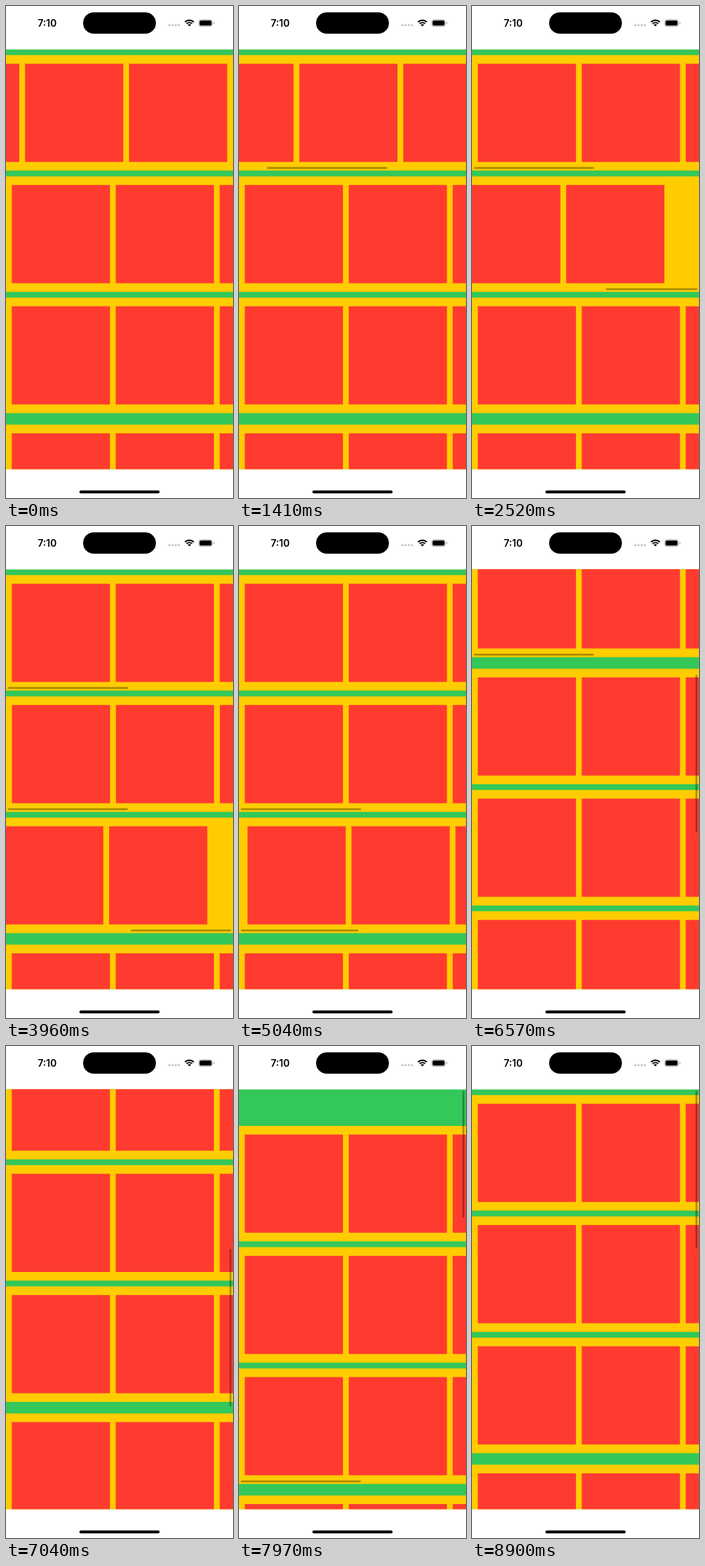
Animation of 295x640 px, one loop 9400 ms. Source, as an HTML page:

```html
<!DOCTYPE html>
<html lang="en">
<head>
<meta charset="utf-8">
<title>Nested scrolling</title>
<style>
  html, body { margin: 0; width: 100%; height: 100%; overflow: hidden; background: #fff; }
  svg { display: block; width: 100vw; height: 100vh; }
  .clock { font: 600 17px Inter, Roboto, sans-serif; text-anchor: middle; }
  .page { fill: #34c759; }
  .row { fill: #fc0; }
  .card { fill: #ff3b30; }
  .bar { fill: #000; opacity: 0; }
</style>
</head>
<body>
<svg viewBox="0 0 393 852" preserveAspectRatio="none">
  <text class="clock" x="71.3" y="35.3">7:10</text>
  <rect x="133.5" y="11" width="126" height="37" rx="18.5"/>
  <g fill="#c4c4c6">
    <circle cx="283" cy="33.2" r="1.9"/><circle cx="288.4" cy="33.2" r="1.9"/>
    <circle cx="293.8" cy="33.2" r="1.9"/><circle cx="299.2" cy="33.2" r="1.9"/>
  </g>
  <g fill="none" stroke="#000" stroke-width="2.6">
    <path d="M309.9 27.8A10.8 10.8 0 0 1 325.1 27.8M312.8 30.7A6.7 6.7 0 0 1 322.2 30.7"/>
  </g>
  <path d="M314.7 32.6A4 4 0 0 1 320.3 32.6L317.5 35.4Z"/>
  <rect x="333.5" y="23.5" width="24" height="12" rx="3.8" fill="none" stroke="#a6a6a6"/>
  <rect x="335" y="25" width="21" height="9" rx="2.5"/>
  <path d="M359.3 27.5Q360.8 28 360.8 29.5T359.3 31.5Z" fill="#a6a6a6"/>
  <rect x="127" y="839" width="139" height="5" rx="2.5"/>

  <svg id="view" y="75" width="393" height="727">
    <rect class="page" width="393" height="727"/>
    <g id="content"></g>
  </svg>
</svg>
<script>
// All lengths are in points, all times in milliseconds.
const LOOP = 9400, WIDTH = 393, HEIGHT = 727;
const ROW_WIDTH = 730, ROW_END = ROW_WIDTH - WIDTH, PAGE_HEIGHT = 1920;
const SPRING = 10;  // bounce stiffness, per second

// Screen refreshes come in bursts: first, last, count.
const bursts = [
  [880, 990, 2], [1170, 2070, 9], [2180, 2720, 6], [2860, 3760, 9],
  [3860, 4730, 9], [4830, 5040, 3], [5200, 5550, 4], [6050, 6920, 9],
  [7040, 7240, 3], [7510, 8390, 9], [8500, 8610, 2], [8780, 8900, 2]
];

function refreshTime(t) {
  const burst = bursts.findLast(([first]) => t >= first);
  if (!burst) return 0;
  const [first, last, count] = burst;
  const step = (last - first) / (count - 1);
  return first + step * Math.min(count - 1, Math.floor((t - first) / step + 0.1));
}

// Accelerates from rest to arrive at `to` with the given speed in points per second.
function drag(from, to, speed, at, until, t) {
  const u = (t - at) / (until - at);
  const slope = Math.sign(to - from) * speed * (until - at) / 1000;
  return from + (to - from) * u * u * (3 - 2 * u) + slope * u * u * (u - 1);
}

// Reaches an edge at time `hit`, overshoots and springs back.
const bounce = (at, hit, to, speed) => ({ at, run(from, t) {
  if (t < hit) return drag(from, to, speed, at, hit, t);
  const s = (t - hit) / 1000;
  return to + Math.sign(to - from) * speed * s * Math.exp(-SPRING * s);
} });

// Drags to `to`, then coasts with friction until the time `stop`.
const glide = (at, release, stop, to, speed) => ({ at, run(from, t) {
  if (t < release) return drag(from, to, speed, at, release, t);
  const s = (Math.min(t, stop) - release) / 1000;
  return to + speed * 0.5 * (1 - Math.exp(-s / 0.5));
} });

const position = (start, moves, t) => moves.reduce((from, move, i) =>
  t < move.at ? from : move.run(from, Math.min(t, moves[i + 1]?.at ?? LOOP)), start);

const ramp = (t, at, length) => Math.max(0, Math.min(1, (t - at) / length));

const rowMotion = [
  { start: ROW_END, show: 820, hide: 3980,
    moves: [bounce(1140, 1460, 0, 1200)] },
  { start: 0, show: 2090, hide: 5150,
    moves: [bounce(2120, 2405, ROW_END, 1360), bounce(2840, 3150, 0, 1200)] },
  { start: 0, show: 3470, hide: 8350,
    moves: [bounce(3500, 3808, ROW_END, 1071), bounce(4230, 4560, 0, 1200)] }
];
const pageMotion = { start: 0, show: 5970, hide: LOOP,
  moves: [glide(5990, 6190, 7240, 177, 1350), bounce(7470, 7850, 0, 1450)] };

function add(parent, tag, attributes) {
  const node = document.createElementNS("http://www.w3.org/2000/svg", tag);
  for (const name in attributes) node.setAttribute(name, attributes[name]);
  return parent.appendChild(node);
}

const view = document.getElementById("view");
const content = document.getElementById("content");
const rows = Array.from({ length: 9 }, (_, i) => {
  const y = 10 + Math.floor(i / 3) * 640 + (i % 3) * 210;
  const row = add(content, "g", { transform: `translate(0 ${y})` });
  add(row, "rect", { class: "row", width: WIDTH, height: 200 });
  const cards = add(row, "g", {});
  for (let k = 0; k < 4; k++)
    add(cards, "rect", { class: "card", x: 10 + k * 180, y: 15, width: 170, height: 170 });
  const bar = add(row, "rect", { class: "bar", y: 194, height: 3, rx: 1.5 });
  return { cards, bar };
});
const pageBar = add(view, "rect", { class: "bar", x: 387, width: 3, rx: 1.5 });

function placeBar(bar, axis, size, offset, visible, total, motion, t) {
  const track = visible - 6, full = track * visible / total, end = total - visible;
  const inside = Math.max(0, Math.min(end, offset));
  const length = full - Math.abs(offset - inside);
  bar.setAttribute(axis, 3 + (track - length) * inside / end);
  bar.setAttribute(size, length);
  bar.style.opacity = 0.35 * (ramp(t, motion.show, 100) - ramp(t, motion.hide, 260));
}

function draw(now) {
  const t = refreshTime(now % LOOP);
  rowMotion.forEach((motion, i) => {
    const x = position(motion.start, motion.moves, t);
    rows[i].cards.setAttribute("transform", `translate(${-x} 0)`);
    placeBar(rows[i].bar, "x", "width", x, WIDTH, ROW_WIDTH, motion, t);
  });
  const y = position(pageMotion.start, pageMotion.moves, t);
  content.setAttribute("transform", `translate(0 ${-y})`);
  placeBar(pageBar, "y", "height", y, HEIGHT, PAGE_HEIGHT, pageMotion, t);
}

const begin = performance.now();
function tick() {
  draw(performance.now() - begin);
  requestAnimationFrame(tick);
}
tick();
</script>
</body>
</html>
```
